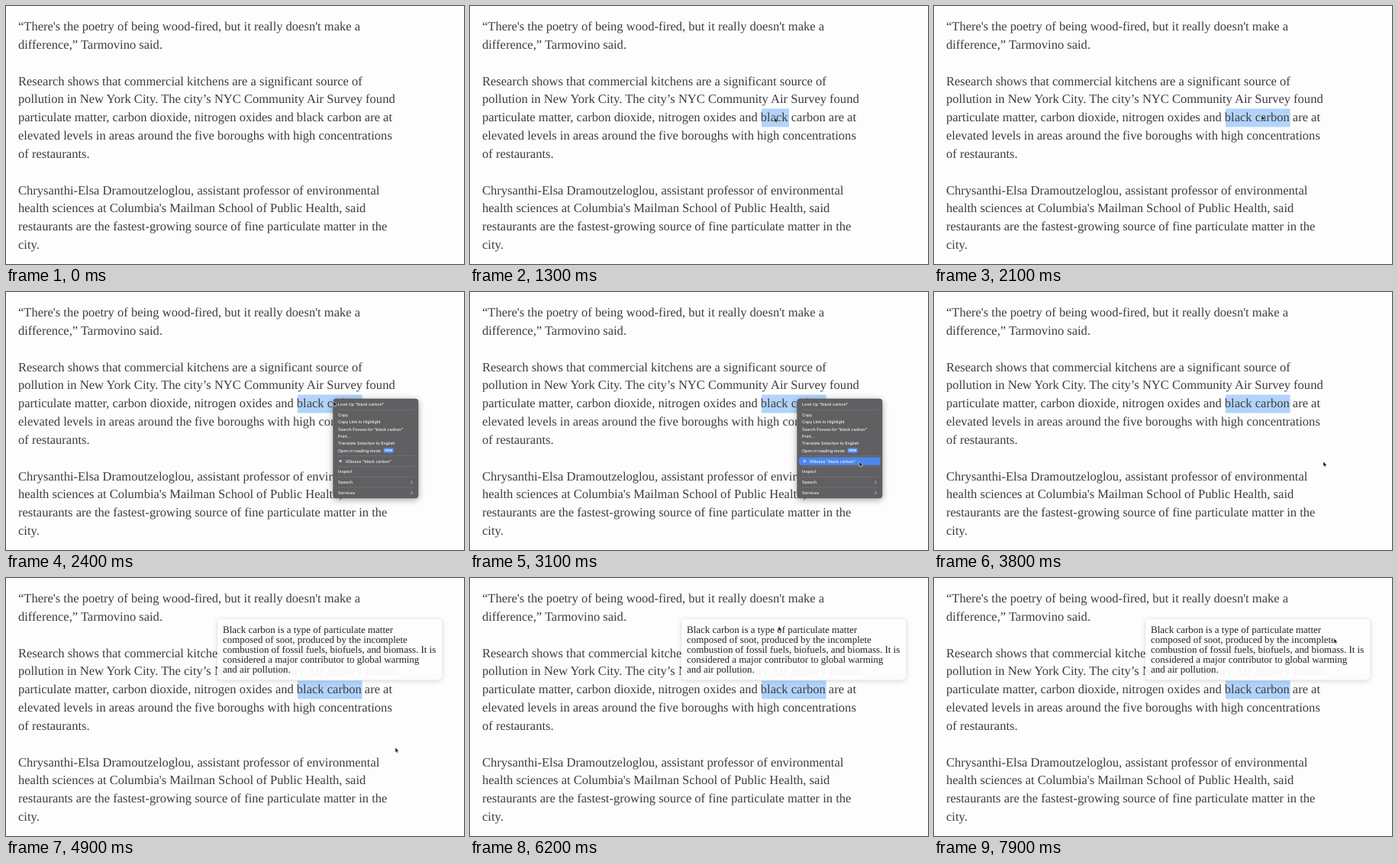
Animation, 600 px wide and 338 px high, one loop 8000 ms. Source, as an HTML page:

```html
<!DOCTYPE html>
<html lang="en">
<head>
<meta charset="utf-8">
<title>Look up a selection</title>
<style>
  html, body { margin: 0; width: 100%; height: 100%; overflow: hidden; background: #fdfdfd; }
  svg { display: block; width: 600px; height: 338px; }
  text { white-space: pre; text-rendering: geometricPrecision; }
  #article { font: 16.52px "Liberation Serif", serif; fill: #3d3d3d; }
  #card text { font: 12.95px "Liberation Serif", serif; fill: #222; }
  #card rect { fill: #fff; fill-opacity: .94; filter: drop-shadow(0 1px 3px rgba(0, 0, 0, .18)); }
  #menu text { font: 500 5.3px Inter, sans-serif; fill: #f4f4f4; }
  #panel { fill: #606062; stroke: #4c4c4e; stroke-width: .5; filter: drop-shadow(0 2px 4px rgba(0, 0, 0, .35)); }
  #menu path { fill: none; stroke: #ddd; stroke-width: .8; }
  #menu line { stroke: #7b7b7d; stroke-width: .6; }
</style>
</head>
<body>
<svg viewBox="0 0 600 338">
  <rect id="selection" x="382" y="134.5" height="24" fill="#b2d4fc"/>
  <g id="article"></g>
  <g id="card"><rect x="277" y="54" width="294" height="79.5" rx="5"/></g>
  <g id="menu">
    <rect id="panel" x="428.7" y="140" width="111.3" height="130" rx="3.5"/>
    <rect id="hover" x="431" width="106.6" height="10.4" rx="2" fill="#4b88ee"/>
    <rect x="494.5" y="204.3" width="13.4" height="6.4" rx="1.6" fill="#4b8df6"/>
    <text x="496.2" y="209.1" style="font-size:4.3px;font-weight:700">NEW</text>
    <circle cx="438.2" cy="221.6" r="1.8" fill="#a9c6f7"/>
  </g>
  <path id="pointer" d="M0 0V6.6L1.5 5.3 2.5 7.5 3.6 7 2.7 4.9H4.6Z" fill="#111" stroke="#fff" stroke-width=".5"/>
</svg>
<script>
const LOOP = 8000;
const byId = id => document.getElementById(id);
const [selection, article, card, menu, hover, pointer] =
  ["selection", "article", "card", "menu", "hover", "pointer"].map(byId);

function add(parent, tag, attrs, content = "") {
  const node = document.createElementNS("http://www.w3.org/2000/svg", tag);
  for (const key in attrs) node.setAttribute(key, attrs[key]);
  node.textContent = content;
  parent.append(node);
}

function addLines(parent, x, y, pitch, lines) {
  lines.forEach((line, i) => add(parent, "text", { x, y: y + i * pitch }, line));
}

addLines(article, 16, 32, 23.84, [
  "“There's the poetry of being wood-fired, but it really doesn't make a",
  "difference,” Tarmovino said.",
  "",
  "Research shows that commercial kitchens are a significant source of",
  "pollution in New York City. The city’s NYC Community Air Survey found",
  "particulate matter, carbon dioxide, nitrogen oxides and black carbon are at",
  "elevated levels in areas around the five boroughs with high concentrations",
  "of restaurants.",
  "",
  "Chrysanthi-Elsa Dramoutzeloglou, assistant professor of environmental",
  "health sciences at Columbia's Mailman School of Public Health, said",
  "restaurants are the fastest-growing source of fine particulate matter in the",
  "city."
]);

addLines(card, 284, 72, 13.05, [
  "Black carbon is a type of particulate matter",
  "composed of soot, produced by the incomplete",
  "combustion of fossil fuels, biofuels, and biomass. It is",
  "considered a major contributor to global warming",
  "and air pollution."
]);

// Menu entries: middle of the row, label, left edge
const items = [
  [147.3, "Look Up “black carbon”"],
  [161, "Copy"],
  [170.4, "Copy Link to Highlight"],
  [179.7, "Search Fovexa for “black carbon”"],
  [189, "Print..."],
  [198.3, "Translate Selection to English"],
  [207.6, "Open in reading mode"],
  [221.6, "VGlosso “black carbon”", 444.5],
  [235.5, "Inspect"],
  [249.3, "Speech"],
  [263.1, "Services"]
];
for (const [y, label, x = 435] of items) add(menu, "text", { x, y: y + 1.9 }, label);
for (const y of [154.2, 214.6, 228.6, 242.4, 256.2])
  add(menu, "line", { x1: 434, x2: 535, y1: y, y2: y });
for (const y of [249.3, 263.1]) add(menu, "path", { d: `M530.5 ${y - 2}l2 2l-2 2` });

// Pointer stops: time, x, y
const stops = [
  [1000, 399, 146], [1400, 399, 146], [1800, 429, 143], [2450, 429, 143],
  [3000, 510, 222], [5150, 510, 222], [5650, 302, 64], [5800, 304, 64],
  [6200, 404, 63], [6600, 497, 64], [6800, 331, 76], [6900, 345, 76], [7900, 524, 79]
];

function pointerAt(t) {
  const next = stops.findIndex(stop => stop[0] > t);
  if (next < 1) return stops.at(next).slice(1);
  const [t0, x0, y0] = stops[next - 1], [t1, x1, y1] = stops[next];
  const u = (t - t0) / (t1 - t0), ease = u * u * (3 - 2 * u);
  return [x0 + (x1 - x0) * ease, y0 + (y1 - y0) * ease];
}

const show = (node, visible) => node.style.display = visible ? "" : "none";

function draw(now) {
  const t = now % LOOP;
  const [x, y] = pointerAt(t);
  show(pointer, t >= 1000);
  pointer.setAttribute("transform", `translate(${x} ${y})`);

  // The selection grows by whole words
  show(selection, t >= 1300);
  selection.setAttribute("width", x > 421 || t > 1800 ? 84.6 : 36);

  show(menu, t >= 2300 && t < 3550);
  menu.style.opacity = Math.min(1, (3550 - t) / 150);
  const row = items.find(item => Math.abs(item[0] - y) < 5.2);
  show(hover, row && x > 431);
  if (row) hover.setAttribute("y", row[0] - 5.2);

  show(card, t >= 4900);
  requestAnimationFrame(draw);
}
requestAnimationFrame(draw);
</script>
</body>
</html>
```
